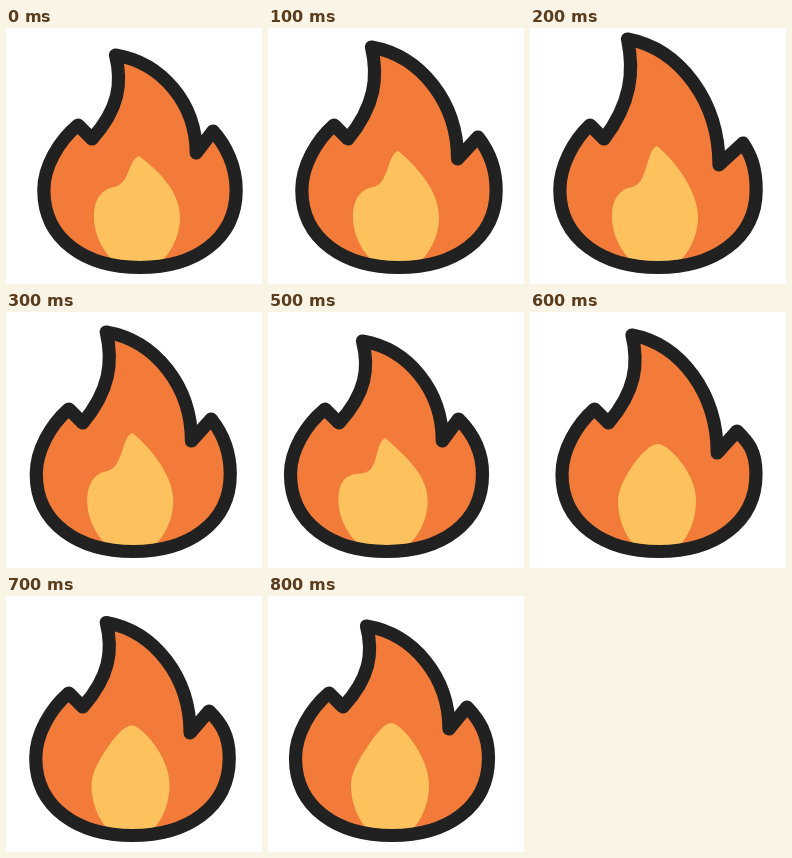
These frames come from a looping animation (256 px wide and 256 px high, 0.9 s). An HTML page:

```html
<!DOCTYPE html>
<html lang="en">
<head>
<meta charset="utf-8">
<title>Flame</title>
<style>
html, body { margin: 0; width: 100%; height: 100%; overflow: hidden; background: #fff; }
svg { display: block; width: 100%; height: 100%; }
</style>
</head>
<body>
<svg viewBox="0 0 256 256">
  <path id="body" fill="#f27b3a"/>
  <path id="core" fill="#fdc25e"/>
  <path id="line" fill="none" stroke="#212121" stroke-width="13.2" stroke-linejoin="round"/>
</svg>
<script>
const STEP = 100, STEPS = 9;

// x: centre, tip: top of the flame, spread: reach of the right spike, spike: its height,
// core: top of the inner flame, bump: strength of its left shoulder
const POSES = [
  { at: 0, x: 134,   tip: 27, spread: 73, spike: 103, core: 128, bump: 1 },
  { at: 2, x: 128,   tip: 11, spread: 85, spike: 115, core: 118, bump: 1 },
  { at: 4, x: 126.5, tip: 29, spread: 71, spike: 99,  core: 124, bump: 1 },
  { at: 5, x: 118.5, tip: 29, spread: 72, spike: 107, core: 126, bump: 1.4 },
  { at: 6, x: 129,   tip: 23, spread: 78, spike: 119, core: 132, bump: 0 },
  { at: 8, x: 124,   tip: 30, spread: 75, spike: 111, core: 127, bump: 0 }
];

const $ = id => document.getElementById(id);

function poseAt(step) {
  const next = POSES.find(p => p.at >= step);
  const prev = POSES.findLast(p => p.at <= step);
  const t = next === prev ? 0 : (step - prev.at) / (next.at - prev.at);
  const pose = {};
  for (const key in prev) pose[key] = prev[key] + (next[key] - prev[key]) * t;
  return pose;
}

// All parts follow the centre; a wider spread pulls tip and spikes outwards.
function outerPath({ x, tip, spread, spike }) {
  const side = 162, base = 239.5, half = 84 + spread / 6;
  const l = x - half, r = x + half;
  const tx = x + 12 - spread / 2;
  const sx = x - 25.5 - spread / 2, sy = 97;
  const nx = sx + 14, ny = sy + 14;
  const px = x + spread;
  const mx = x + 27 + spread * 0.4, my = spike + 22;
  const drop = ny - tip, rise = my - tip;
  return `M${tx} ${tip}
    C${tx + 7} ${tip + drop * 0.33} ${nx + 27} ${ny - drop * 0.36} ${nx} ${ny}
    L${sx} ${sy}
    C${sx + (l - sx) * 0.55} ${sy + (side - sy) * 0.24} ${l} ${side - 24} ${l} ${side}
    C${l} ${side + 50} ${x - 54} ${base} ${x} ${base}
    S${r} ${side + 50} ${r} ${side}
    C${r} ${side - 24} ${px + (r - px) * 0.55} ${spike + (side - spike) * 0.24} ${px} ${spike}
    L${mx} ${my}
    C${mx} ${my - rise * 0.5} ${tx + (mx - tx) * 0.58} ${tip + rise * 0.08} ${tx} ${tip}Z`;
}

function innerPath({ x, core, bump }) {
  const side = 189, base = 243;
  const l = x - 41 - 5 * bump, r = x + 37 + 3 * bump;
  const tx = x - 1, kx = x - 26, ky = 153 + 6 * bump;
  return `M${tx} ${core}
    C${tx - 8 - 3 * bump} ${core + 4 * bump} ${kx + 6 + 10 * bump} ${ky - 9 + 6 * bump} ${kx} ${ky}
    S${l} 176 ${l} ${side}
    C${l} 215 ${x - 26} ${base} ${x - 2} ${base}
    S${r} 215 ${r} ${side}
    C${r} 160 ${tx + 10 + 3 * bump} ${core + 10 * bump} ${tx} ${core}Z`;
}

function draw(ms) {
  const pose = poseAt(Math.floor(ms / STEP) % STEPS);
  const shape = outerPath(pose);
  $("body").setAttribute("d", shape);
  $("line").setAttribute("d", shape);
  $("core").setAttribute("d", innerPath(pose));
}

let start;
function tick(now) {
  start ??= now;
  draw(Math.max(0, now - start));
  requestAnimationFrame(tick);
}
draw(0);
requestAnimationFrame(tick);
</script>
</body>
</html>
```
